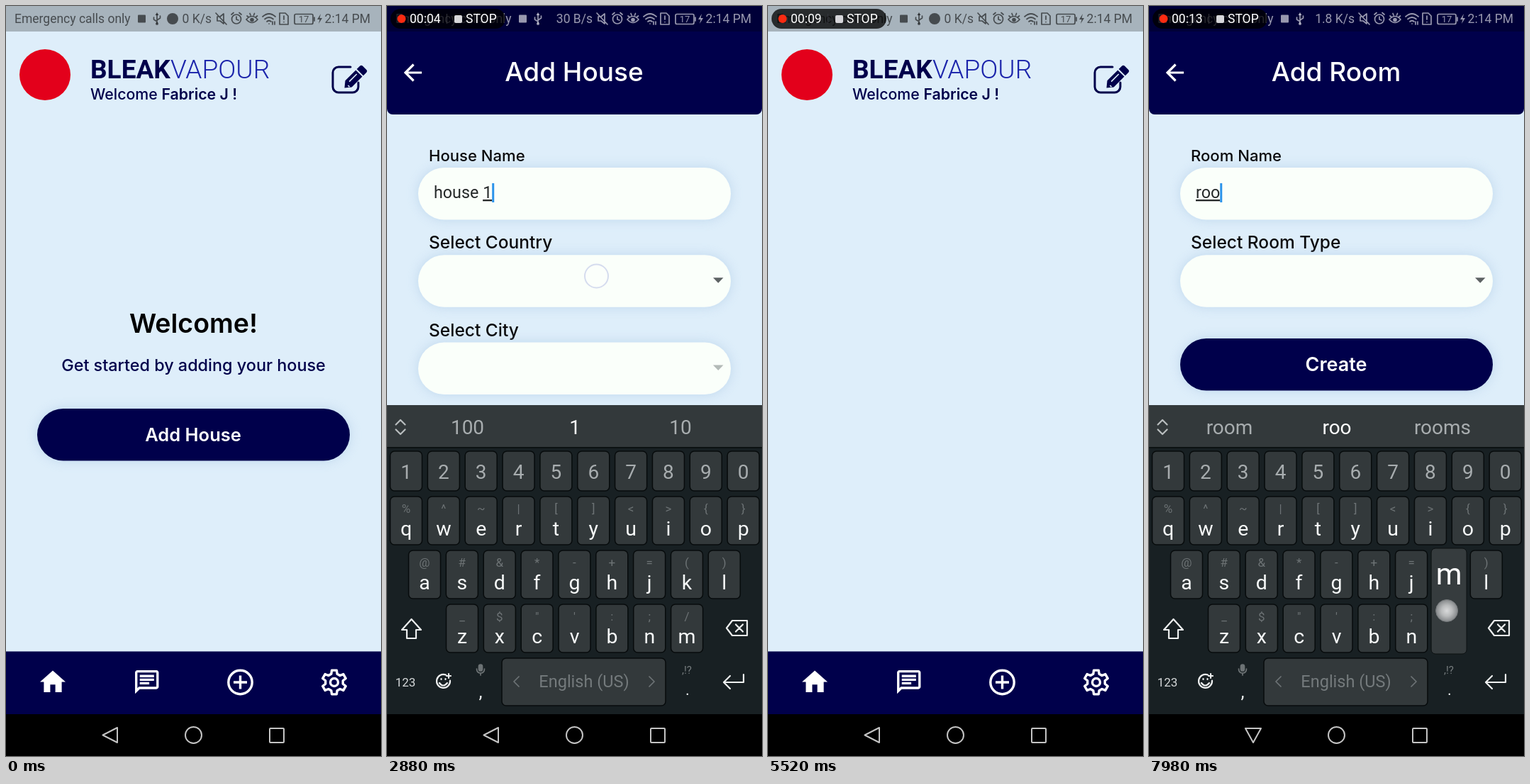
These frames come from a looping animation (529 px wide and 1058 px high, 8000 ms). An HTML page:

```html
<!DOCTYPE html>
<html lang="en">
<head>
<meta charset="utf-8">
<title>Add a house</title>
<style>
html, body { margin: 0; width: 100%; height: 100%; overflow: hidden; background: #000; }
svg { display: block; width: 100vw; height: 100vh; }
text { font-family: Roboto, Arial, sans-serif; white-space: pre; }
.p { font-family: Inter, "Open Sans", sans-serif; font-weight: 500; }
.b { font-weight: 600; }
.m { text-anchor: middle; }
.e { text-anchor: end; }
.u { text-decoration: underline; text-decoration-thickness: 1.5px; text-underline-offset: 2px; }
.soft { filter: drop-shadow(0 0 8px rgba(150, 185, 222, .42)); }
.line { fill: none; stroke: currentColor; stroke-width: 1.7; stroke-linecap: round; stroke-linejoin: round; }
.navy { fill: #00004b; }
</style>
</head>
<body>
<svg viewBox="0 0 529 1058">
  <defs>
    <radialGradient id="glow">
      <stop offset="0" stop-color="#d8d9da"/><stop offset=".5" stop-color="#b9bbbc"/>
      <stop offset="1" stop-color="#85888a"/>
    </radialGradient>
  </defs>

  <g id="home">
    <rect width="529" height="999" fill="#deeefa"/>
    <circle cx="55" cy="97" r="36" fill="#e3001b"/>
    <text x="119" y="102" font-size="37" font-weight="700" class="navy">BLEAK<tspan font-weight="300" fill="#1b24ab">VAPOUR</tspan></text>
    <text x="119" y="132" font-size="21.300" class="p navy">Welcome <tspan class="b">Fabrice J !</tspan></text>
    <path d="M486 86H469a8 8 0 0 0-8 8v20a8 8 0 0 0 8 8h20a8 8 0 0 0 8-8v-6" fill="none" stroke="#00004b" stroke-width="3" stroke-linecap="round"/>
    <g transform="translate(477.500 115.500) rotate(-45)" class="navy">
      <path d="M0 0L8-6.500H29V6.500H8ZM31-6.500h6q3 0 3 3v7q0 3-3 3h-6z"/>
      <path d="M11-1.500h15M6 1v3" stroke="#deeefa" stroke-width="1.600"/>
    </g>
    <g id="welcome">
      <text x="264.500" y="461" font-size="37.500" class="p b m">Welcome!</text>
      <text x="264.500" y="515" font-size="23.400" class="p m navy">Get started by adding your house</text>
      <rect x="44" y="568" width="441" height="73.500" rx="36.700" class="navy soft"/>
      <text x="264" y="614" font-size="25.500" fill="#fff" class="p b m">Add House</text>
    </g>
    <rect y="910.500" width="529" height="88.500" class="navy"/>
    <g fill="#fff">
      <path transform="translate(44.400 932) scale(1.800)" d="M10 20v-6h4v6h5v-8h3L12 3 2 12h3v8z"/>
      <path transform="translate(178.700 933.600) scale(1.670)" d="M4 4h16v12H5.170L4 17.170V4m0-2c-1.100 0-2 .9-2 2v18l4-4h14c1.100 0 2-.9 2-2V4c0-1.100-.9-2-2-2H4zm2 10h8v2H6zm0-3h12v2H6zm0-3h12v2H6z"/>
    </g>
    <g fill="none" stroke="#fff" stroke-width="3.400" stroke-linejoin="round">
      <circle cx="330.500" cy="954" r="16.700"/><path d="M321 954h19M330.500 944.500v19"/>
      <path id="gear"/><circle cx="463" cy="954" r="5.500"/>
    </g>
    <rect id="dim" width="529" height="999" opacity="0"/>
  </g>

  <g id="house"></g>
  <g id="room"></g>

  <rect width="529" height="36" opacity=".25"/>
  <g id="status" font-size="17.500">
    <g fill="currentColor">
      <text x="12" y="24">Emergency calls only</text>
      <rect x="186" y="12.500" width="11" height="11" rx="1"/>
      <text id="speed" x="290" y="24" class="e"></text>
      <circle id="chat" cx="235" cy="18" r="8"/>
      <text x="420" y="23" font-size="13" class="m">17</text>
      <path d="M444 11l-5 8h3.500l-1.500 6 5-8h-3.500z"/>
      <text x="514" y="24" class="e">2:14 PM</text>
      <circle cx="213" cy="25" r="2"/><path d="M210.500 13l2.500-4 2.500 4z"/>
      <circle cx="347" cy="19.500" r="2.800"/>
    </g>
    <g class="line">
      <path d="M213 24V12M213 22l-4.500-3v-3M213 20l4.500-3v-3"/>
      <path d="M298 15h4l5-4v14l-5-4h-4zM296 10l15 16"/>
      <circle cx="325" cy="18.500" r="6.500"/><path d="M325 15v4l3 1M318 12l3-2.500M332 12l-3-2.500"/>
      <path d="M339 19q8-9 16 0q-8 9-16 0M340 14l2 1.500M344 10.500l1 2.500M350.500 10.500l-1 2.500M354.500 14l-2 1.500"/>
      <path d="M362 15q9-8 18 0M365 18.500q6-5 12 0M368 22q3-2.500 6 0M371 25h.1M376 22v4M379 22v4"/>
      <path d="M386 10h8l4 4v12h-12zM392 14v5M392 22.500v.1"/>
      <rect x="407" y="11.500" width="26" height="14" rx="2"/><path d="M435 16v5"/>
    </g>
  </g>

  <g id="pill" font-size="17.500" fill="#fff">
    <rect x="5" y="4" width="162" height="28" rx="14" fill="#000" opacity=".76"/>
    <circle id="rec" cx="20.500" cy="18" r="6" fill="#fb2b12"/>
    <text id="clock" x="32" y="24"></text>
    <path d="M84.500 11v14" stroke="#34343c"/>
    <rect x="95" y="13" width="11" height="11" rx="2" fill="#d6d6da"/>
    <text x="111" y="24">STOP</text>
  </g>

  <rect y="999" width="529" height="59"/>
  <g id="board"></g>
  <g fill="none" stroke="#c4c4c4" stroke-width="2" stroke-linejoin="round">
    <path id="back"/><circle cx="264.500" cy="1028.500" r="11.500"/>
    <rect x="372" y="1019" width="20" height="20" rx="1"/>
  </g>
  <circle id="touch"/>
</svg>

<script>
const $ = id => document.getElementById(id);
const LOOP = 8000;
const clamp = v => Math.min(1, Math.max(0, v));
const prog = (t, start, span) => clamp((t - start) / span);
const out = p => 1 - (1 - p) ** 3;
const smooth = p => p * p * (3 - 2 * p);
const show = (el, on) => { el.style.display = on ? '' : 'none'; };
const esc = s => s.replace(/&/g, '&amp;').replace(/</g, '&lt;');
const label = (x, y, size, fill, s, cls = 'm', id = '') =>
  `<text id="${id}" x="${x}" y="${y}" font-size="${size}" fill="${fill}" class="${cls}">${esc(s)}</text>`;
const box = (x, y, w, h, r, fill, extra = '') =>
  `<rect x="${x}" y="${y}" width="${w}" height="${h}" rx="${r}" fill="${fill}" ${extra}/>`;

// Form pages: a heading, a text field, pickers and a button
function form(id, title, hint, names, buttonY) {
  let s = box(0, 0, 529, 999, 0, '#deeefa') + box(0, -10, 529, 163, 8, '#00004b') +
    '<path d="M49 94H27M37.500 82.500L26 94l11.500 11.500" fill="none" stroke="#fff" stroke-width="3.200"/>' +
    label(264, 106, 37, '#fff', title, 'p m') + `<g id="${id}Body">`;
  names.forEach((name, i) => {
    const y = 228 + 123.3 * i;
    s += label(59, y - 9, i ? 24.5 : 22.1, '#0a0a0c', name, 'p') +
      box(44, y, 441, 73.5, 36.7, '#fafffa', 'class="soft"');
    if (i) s += `<path id="${id}Arrow${i}" d="M460 ${y + 32}h14.500l-7.250 7.500z" fill="#5d6263"/>`;
  });
  s += label(66, 271, 20.5, '#707574', hint, '', id + 'Hint') +
    `<text id="${id}Text" x="66" y="271" font-size="23.300" fill="#26292a"><tspan></tspan><tspan></tspan></text>` +
    box(0, 250, 3, 27, 0, '#2b93ea', `id="${id}Caret"`) +
    box(44, buttonY, 441, 73.5, 36.7, '#00004b', 'class="soft"') +
    label(264, buttonY + 46, 27, '#fff', 'Create', 'p b m') + '</g>';
  $(id).innerHTML = s;
}
form('house', 'Add House', 'Enter the house name', ['House Name', 'Select Country', 'Select City'], 592);
form('room', 'Add Room', 'Enter the room name', ['Room Name', 'Select Room Type'], 469);
$('houseBody').insertAdjacentHTML('beforeend', label(66, 395, 23.3, '#26292a', 'LB', '', 'country'));
$('house').insertAdjacentHTML('beforeend',
  '<path id="spinner" fill="none" stroke="#2b93ea" stroke-width="6"/>');

// Keyboard
const STEP = 52.85;
const ROWS = [
  ['1234567890', '', 27, 628, 56],
  ['qwertyuiop', '%^~|[]<>{}', 27, 692, 68],
  ['asdfghjkl', '@#&*-+=()', 53, 768, 68],
  ['zxcvbnm', '_$"\':;/', 106, 844, 68]
];
const keys = {};
const EDGE = 'stroke="#070b0c" stroke-width="1.500"';
let board = box(0, 563, 529, 436, 0, '#182023') + box(0, 563, 529, 59, 0, '#33393b') +
  box(0, 622, 529, 2, 0, '#0c1213');
for (const [chars, hints, x0, y, h] of ROWS) {
  [...chars].forEach((c, i) => {
    const x = x0 + STEP * i;
    keys[c] = [x, y, h];
    board += box(x - 22.5, y, 45, h, 6, '#33393b', EDGE);
    board += hints ? label(x, y + 23, 17, '#6d7375', hints[i]) + label(x, y + 54.5, 28.5, '#f8fafa', c)
                   : label(x, y + 39, 28, '#a8adaf', c);
  });
}
board += box(162, 920, 231, 67, 6, '#33393b', EDGE) + label(278, 961, 23.5, '#747a7c', 'English (US)') +
  label(26, 960, 17, '#d5d8d9', '123') + label(132, 976, 26, '#eceeee', ',') +
  label(424, 972, 22, '#eceeee', '.') + label(423, 942, 15, '#777d7f', ',!?') +
  `<g class="line" color="#6d7375"><path d="M186 946l-7 7 7 7M370 946l7 7-7 7"/>
   <rect x="129.500" y="929" width="5" height="9" rx="2.500" fill="#6d7375"/><path d="M126.500 935q0 6 5.500 6t5.500-6M132 941v3"/></g>
   <g class="line" color="#eef0f0" style="stroke-width:2.200">
   <path d="M34.500 865L48 880h-7v12H28v-12h-7z"/>
   <path d="M487 867h21v21h-21l-8-10.500zM492 872.500l10 10M502 872.500l-10 10"/>
   <path d="M503 943v11h-27M484 945l-9 9 9 9"/>
   <path d="M83 943.500a9.500 9.500 0 1 0 6 8M74 955q5 7 11 0M76.500 949v1M82.500 949v1M87 942v6M84 945h6"/>
   <path d="M12.500 590.500l6.500-6.500 6.500 6.500M12.500 597.500l6.500 6.500 6.500-6.500" stroke="#b9bebf"/></g>`;
for (let i = 0; i < 3; i++) board += label([113.5, 265, 414][i], 604, 28, i === 1 ? '#fff' : '#a8adaf', '', 'm', 'word' + i);
board += '<g id="popup"><rect width="50" rx="6" fill="#363c3e" stroke="#0c1011"/>' +
  label(25, 51, 42, '#fff', '') + '</g>';
$('board').innerHTML = board;

let gear = '';
for (let i = 0; i < 6; i++) {
  for (const [turn, r] of [[-.34, 12.5], [-.2, 17.2], [.2, 17.2], [.34, 12.5]]) {
    const a = i * Math.PI / 3 + turn - Math.PI / 2;
    gear += `${gear ? 'L' : 'M'}${463 + r * Math.cos(a)} ${954 + r * Math.sin(a)}`;
  }
}
$('gear').setAttribute('d', gear + 'z');

// Timetable
const HOLD = 100;
const STROKES = {
  house: [[1420, 'h'], [1570, 'o'], [1760, 'u'], [1930, 's'], [2100, 'e'], [2320, ' '], [2570, '1']],
  room: [[7260, 'r'], [7500, 'o'], [7700, 'o'], [7920, 'm']]
};
const TAPS = [[180, 264, 605], [930, 250, 264], [2736, 295.5, 381], [3400, 290, 390],
  [3724, 342.5, 511.5], [4470, 298.5, 616], [5700, 330, 950], [6620, 262, 264]]
  .concat(...Object.values(STROKES).map(list => list.map(([t, c]) => {
    const [x, y] = keys[c] || [281, 941];
    return [t, x - 3, y + 9, true];
  })));
const SPEEDS = [[0, '0 K/s'], [960, '4 K/s'], [2400, '30 B/s'], [4260, '0 K/s'], [7200, '1.8 K/s']];
const BOARDS = [[1100, 2910], [6840, 9000]];
const WORDS = {
  '': ['ma', 'eh', 'bas'], house: ['houses', 'house', 'housing'],
  '1': ['100', '1', '10'], roo: ['room', 'roo', 'rooms']
};

function place(el, scale, alpha) {
  show(el, alpha > 0);
  el.setAttribute('opacity', alpha);
  el.setAttribute('transform', `translate(264.5 529) scale(${scale}) translate(-264.5 -529)`);
}

function drawPages(t) {
  const a = prog(t, 420, 350), back = prog(t, 5140, 320), b = prog(t, 6060, 350);
  const under = out(a) - out(back) + out(b);
  place($('home'), 1 + .06 * under, 1);
  $('dim').setAttribute('opacity', .55 * under);
  place($('house'), .85 + .15 * out(a) - .1 * out(back), clamp(a * 2.5) * (1 - back));
  place($('room'), .85 + .15 * out(b), clamp(b * 2.5));
  show($('welcome'), t < 3000);

  const loading = t >= 4515;
  show($('houseBody'), !loading);
  show($('country'), t >= 3480);
  $('houseArrow2').setAttribute('fill', t >= 3480 ? '#5d6263' : '#b3bab7');
  show($('spinner'), loading);
  if (loading) drawSpinner(t);
}

function drawSpinner(t) {
  const turn = (t - 4515) / 740, n = Math.floor(turn), f = turn - n;
  const base = n * .75 + (t - 4560) / 2470 - .016;
  const from = base + .75 * smooth(clamp(2 * f - 1));
  const to = base + .75 * smooth(clamp(2 * f)) + .002;
  const at = v => {
    const a = v * 2 * Math.PI;
    return `${264.5 + 28 * Math.sin(a)} ${454 - 28 * Math.cos(a)}`;
  };
  $('spinner').setAttribute('d', `M${at(from)}A28 28 0 ${to - from > .5 ? 1 : 0} 1 ${at(to)}`);
}

function drawField(id, t, open) {
  const text = STROKES[id].filter(([s]) => t >= s + HOLD).map(k => k[1]).join('');
  const cut = text.lastIndexOf(' ') + 1;
  const el = $(id + 'Text'), [done, live] = el.children;
  done.textContent = text.slice(0, cut);
  live.textContent = text.slice(cut);
  live.setAttribute('class', open ? 'u' : '');
  show($(id + 'Hint'), !text);
  show($(id + 'Caret'), open);
  $(id + 'Caret').setAttribute('x', 66 + (text ? el.getComputedTextLength() : 0));
  return text.slice(cut) || text.trim();
}

function drawBoard(t) {
  const span = BOARDS.find(([a, b]) => t >= a && t < b + 120);
  const open = BOARDS.some(([a, b]) => t >= a && t < b);
  const typed = [drawField('house', t, open && t < 5000), drawField('room', t, open && t > 6000)];
  $('back').setAttribute('d', open && t < 2800 || t >= 6900 ? 'M136 1019h22L147 1039z' : 'M157 1018v21L136.500 1028.500z');
  show($('board'), span);
  if (!span) return;
  const enter = prog(t, span[0], 160), leave = prog(t, span[1], 120);
  $('board').setAttribute('transform', `translate(0 ${99 * ((1 - enter) ** 2.7 + leave * leave)})`);
  $('board').setAttribute('opacity', clamp(enter * 2) * (1 - leave));

  const word = typed[t < 6000 ? 0 : 1];
  const full = t < 6000 ? 'house' : 'room';
  const words = WORDS[word] || [full, word, full + 's'];
  words.forEach((w, i) => { $('word' + i).textContent = w; });

  const hit = Object.values(STROKES).flat().find(([s, c]) => t >= s && t < s + HOLD && keys[c]);
  show($('popup'), hit);
  if (hit) {
    const [x, y, h] = keys[hit[1]], [rect, text] = $('popup').children;
    $('popup').setAttribute('transform', `translate(${x - 25} ${y - 79})`);
    rect.setAttribute('height', h + 81);
    text.textContent = hit[1];
  }
}

function drawTouch(t) {
  const tap = TAPS.find(([s]) => t >= s && t < s + 200), el = $('touch');
  show(el, tap);
  if (!tap) return;
  const [start, x, y, dark] = tap;
  const look = {
    cx: x, cy: y, r: dark ? 15.5 : 16.5,
    fill: dark ? 'url(#glow)' : 'rgba(255,255,255,.45)',
    stroke: dark ? '#777b7d' : 'rgba(160,170,220,.6)', 'stroke-width': dark ? 1 : 2,
    opacity: 1 - prog(t, start + 120, 80)
  };
  for (const k in look) el.setAttribute(k, look[k]);
}

function drawStatus(t) {
  const light = t >= 760 && t < 5300 || t >= 6400;
  $('status').setAttribute('color', light ? 'rgba(255,255,255,.6)' : 'rgba(0,0,0,.58)');
  const speed = SPEEDS.filter(([s]) => t >= s).pop()[1];
  $('speed').textContent = speed;
  show($('chat'), speed.length < 6);

  const secs = Math.floor(1.75 * t / 1000 - .6);
  show($('pill'), secs >= 0);
  $('clock').textContent = '00:' + String(Math.max(0, secs)).padStart(2, '0');
  const blink = ((t - 1200) / 615 + 10) % 1;
  show($('rec'), blink < .03 || blink > .41);
}

function draw(t) {
  drawPages(t);
  drawBoard(t);
  drawTouch(t);
  drawStatus(t);
}

const began = performance.now();
function tick() {
  draw((performance.now() - began) % LOOP);
  requestAnimationFrame(tick);
}
tick();
</script>
</body>
</html>
```
